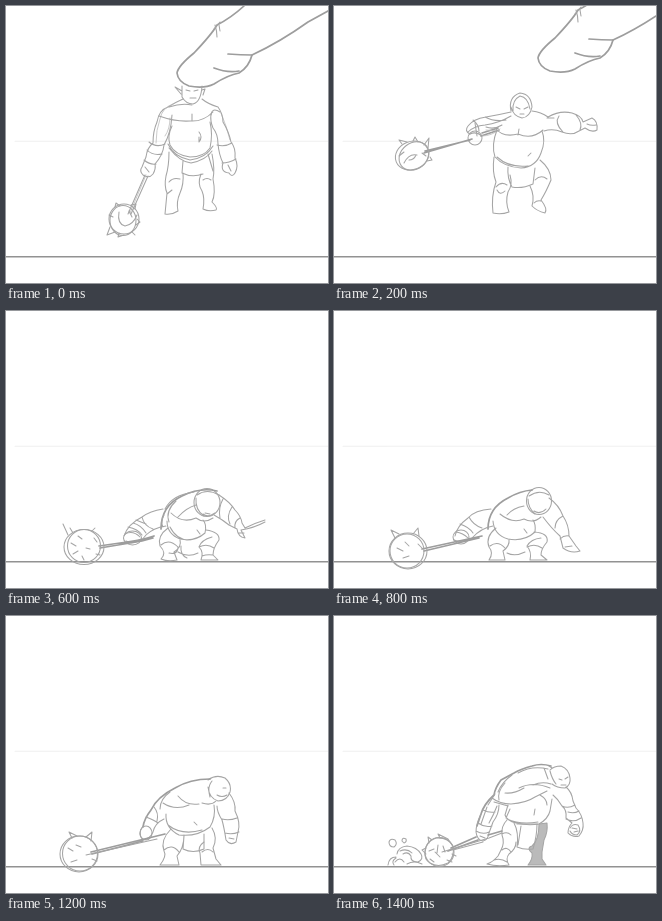
Recreate the animation shown at these times as an HTML page. Size 322 px wide and 277 px high, loop 1900 ms.

```html
<!DOCTYPE html>
<html lang="en">
<head>
<meta charset="utf-8">
<title>Giant with a mace</title>
<style>
html, body { margin: 0; width: 100%; height: 100%; overflow: hidden; background: #fff; }
svg { display: block; width: 100%; height: 100%; }
path, circle, ellipse { fill: none; stroke: #a5a5a5; stroke-width: 1.05; stroke-linecap: round; stroke-linejoin: round; }
.bold { stroke: #9d9d9d; stroke-width: 1.7; }
.thin { stroke: #bdbdbd; stroke-width: .8; }
.shade { fill: #bababa; }
.horizon { stroke: #f0f0f0; }
.ground { stroke: #929292; stroke-width: 1.6; }
.pose { visibility: hidden; animation: beat 1.9s step-end calc(var(--at) * 1s - 1.9s) infinite; }
.pose.hold { animation-name: hold; }
@keyframes beat { 0% { visibility: visible; } 10.5263%, 100% { visibility: hidden; } }
@keyframes hold { 0% { visibility: visible; } 26.3158%, 100% { visibility: hidden; } }
</style>
</head>
<body>
<svg viewBox="0 0 322 277">
<defs>
  <g id="finger">
    <path class="bold" d="M238 0Q225 12 211 19Q206 28 188 47Q172 60 171 67Q172 76 183 80Q198 83 208 78Q222 69 233 67Q243 61 246 49Q274 36 302 16L342 -6"/>
    <path class="bold" d="M208 62Q221 67 233 65M246 49Q235 49 222 48"/>
    <path d="M209 19Q211 25 211 31M214 16L208 23M213 19L214 25"/>
  </g>
</defs>

<path class="horizon" d="M9 135.3H322"/>
<path class="ground" d="M0 250.8H322"/>

<!-- pressed -->
<g class="pose" style="--at:0">
  <use href="#finger"/>
  <path d="M176 80V91Q180 98 187 98Q195 96 196 80M176 85L169 81L175 88M196 84L199 83L197 89M180 84L184 85M188 85L192 84M184 92H190"/>
  <path d="M177 93Q170 96 162 101Q153 104 151 116Q147 125 147 137Q141 142 140 151L136 161Q133 165 137 169Q143 173 147 168Q150 163 149 158Q157 149 158 139Q165 127 166 109"/>
  <path class="thin" d="M167 98Q156 102 154 113Q150 124 150 137M164 112Q164 123 159 130M215 107Q221 121 224 134"/>
  <path d="M143 136Q150 142 159 138M138 154Q144 159 150 158M141 144Q147 150 156 148M139 161L143 166"/>
  <path d="M163 101Q175 97 186 99M196 93Q202 98 212 101Q217 108 217 116Q223 126 225 136Q230 142 229 152Q233 160 229 167Q226 172 223 167Q214 166 217 157Q213 149 212 138Q212 128 207 122Q204 115 205 108"/>
  <path d="M214 106Q206 101 205 109M211 139Q219 141 226 137M216 157Q223 157 230 153M222 159L225 165"/>
  <path d="M153 110Q170 116 184 115Q197 116 207 106M186 108V115M166 120Q161 130 164 139Q169 149 184 151Q198 151 204 142Q207 128 204 116M193 126Q197 131 193 136V131"/>
  <path d="M162 138Q168 151 184 154Q200 152 207 140M163 142Q174 156 185 157Q200 154 206 145M177 155L176 167Q186 172 197 168M202 148L207 165"/>
  <path d="M163 146Q163 160 160 170Q158 180 161 187L159 208Q166 209 172 205Q170 196 174 187Q178 178 177 167M163 176Q167 171 174 173M161 188L166 184"/>
  <path d="M206 148Q209 163 207 173Q210 188 206 196Q212 202 210 204Q203 206 197 203Q199 192 196 185Q191 178 195 168M197 174Q201 171 205 174"/>
  <path d="M139 169L122 208M142 170L125 208" stroke-width="1.5"/>
  <path class="thin" d="M140 169L124 207"/>
  <circle cx="118" cy="213" r="15"/>
  <ellipse cx="117" cy="214.500" rx="13" ry="15"/>
  <path d="M113 206Q111 218 119 220Q127 219 131 209M123 205L126 211M104 221L101 229L109 226M109 201L110 197L114 200M125 199L130 198L129 203M131 213L134 216L130 219M126 226L129 229M113 227L112 231L118 229M103 209L107 211"/>
</g>

<!-- swing -->
<g class="pose" style="--at:.2">
  <use href="#finger" x="33" y="-15"/>
  <path d="M177 105Q174 91 186 87Q197 88 198 101Q196 111 188 112Q179 110 177 101M179 105Q178 94 186 90Q194 91 196 103M182 101L186 103M190 103L194 101M186 108H190"/>
  <path d="M177 106Q164 109 152 111Q139 113 134 120Q130 125 136 128M177 110Q165 117 151 119Q140 120 134 126M139 114Q145 119 145 125M151 111Q160 116 172 114"/>
  <circle cx="141" cy="132" r="7"/>
  <path d="M136 128Q142 125 148 130M141 117L143 130M152 121Q160 124 168 119"/>
  <path class="bold" d="M90 147L138 133M91 145L136 134M147 130L165 124M148 127L164 122"/>
  <path class="thin" d="M148 130Q158 130 166 123M152 124L165 125"/>
  <ellipse cx="78" cy="149.500" rx="17" ry="14" transform="rotate(-22 78 149.500)"/>
  <ellipse cx="80" cy="150" rx="16" ry="13" transform="rotate(-38 80 150)"/>
  <path d="M70 157Q75 147 83 149M75 154Q80 154 82 149M68 138L65 134L73 136M79 135L81 131L84 136M90 139L95 132L94 142M96 151L98 154L93 155M65 150L70 146M88 147L92 150"/>
  <path d="M198 105Q207 106 214 111Q226 104 238 107Q248 110 249 116L258 112Q264 115 263 124Q258 127 251 122L245 125Q238 130 228 126Q219 122 210 125M225 110Q220 117 229 126M242 109Q249 117 246 124M253 118Q257 120 262 119M213 112L220 112"/>
  <path d="M161 122Q169 132 184 128Q198 134 209 124M185 123L184 129M163 124Q157 139 161 151Q170 161 187 162Q202 161 207 147Q212 135 208 125M194 150L197 147M163 151Q175 162 194 160"/>
  <path d="M160 151Q158 166 162 176Q157 190 159 207Q167 209 175 206Q171 196 174 186Q179 179 176 169M162 181Q167 175 173 179M174 161Q173 172 178 181Q188 183 199 178L201 162M163 184Q166 190 171 185"/>
  <path d="M206 154Q217 163 217 174Q212 186 207 194Q214 203 211 207Q203 205 198 200Q201 190 196 180M201 174Q207 168 213 173M200 197Q203 194 207 195"/>
</g>

<!-- drop -->
<g class="pose" style="--at:.4">
  <path class="bold" d="M279 -1Q268 15 256 23Q249 27 250 34Q256 46 271 47Q288 45 301 33Q304 30 313 28Q320 23 325 13M287 27Q296 31 304 30M310 14L324 13"/>
  <path d="M271 0L264 9L251 27"/>
  <path d="M172 143Q169 131 179 126Q189 123 193 130Q196 138 192 145Q185 149 176 147M172 137Q174 127 183 125M183 133L186 132M189 134L192 133M186 142H190M173 138L170 148L176 147"/>
  <path d="M194 145Q200 144 204 140Q208 137 218 136Q225 137 232 140M199 158L203 154Q211 154 220 150L231 151M217 137Q213 143 218 151M228 138Q231 144 228 151M207 141L204 147"/>
  <path d="M231 144Q231 138 238 138Q245 140 244 146Q240 151 234 150Q230 148 231 144M234 142Q238 139 242 144M235 148L240 146"/>
  <path d="M172 148Q163 149 157 155Q152 162 152 166L143 169Q138 174 138 181M169 149L162 152L158 159M174 158Q169 160 165 166L157 173M143 168Q151 167 158 174Q158 181 154 186M140 174Q147 175 153 182M148 167L157 171"/>
  <path class="bold" d="M146 170Q154 169 157 176L154 185M142 176L138 182"/>
  <path d="M138 181Q128 187 127 193Q130 197 137 193Q146 188 151 185M131 190L138 185M134 194L144 180"/>
  <path class="bold" d="M153 176L101 219M154 180L102 221"/>
  <path d="M146 184L101 222"/>
  <path d="M79 221Q85 214 95 217Q105 222 104 233Q99 244 88 244Q77 242 75 232Q75 224 81 219"/>
  <circle cx="91" cy="231" r="18.200"/>
  <path d="M79 225Q83 219 90 218M79 234Q88 239 97 235M82 231L86 233M82 216L80 210L87 215M88 215L89 209L92 215M96 217L103 220L99 224M91 222L93 226M94 236L98 233"/>
  <path d="M158 160Q164 165 170 168Q179 169 184 165Q193 168 199 159M187 158L186 164M162 168Q157 181 161 191Q170 201 183 203Q197 200 202 190Q207 181 205 173L200 161M189 175Q192 179 190 183M160 187Q169 199 183 201"/>
  <path d="M161 191L165 204L172 207Q173 216 178 220L198 221L197 202M200 196L199 220M203 188L200 199M165 200Q181 209 199 199"/>
  <path d="M159 189L163 203Q157 211 161 221L160 230L162 240Q156 247 158 252Q163 256 169 252L175 240Q169 232 172 218M162 221Q166 215 171 220M162 240Q168 236 175 240M159 247Q164 249 169 244"/>
  <path d="M201 218Q207 228 203 237L204 240L222 237Q213 246 202 248Q196 247 197 239Q190 229 193 221M198 239L205 246L218 239"/>
</g>

<!-- impact -->
<g class="pose" style="--at:.6">
  <ellipse cx="201" cy="191.500" rx="13" ry="14"/>
  <path d="M191 184Q201 177 213 184M190 187Q189 199 198 205M197 203Q202 207 209 202M199 202L204 203"/>
  <path class="bold" d="M155 218Q155 195 176 185Q194 176 211 180"/>
  <path d="M159 198Q166 184 188 181M163 211Q159 200 170 190M190 194Q180 197 172 206M165 202Q176 213 190 207Q198 213 207 207"/>
  <path d="M157 198Q144 200 136 206Q122 213 118 225M160 215Q147 217 140 224L135 230M136 206Q138 215 147 218M127 212Q135 214 140 222M122 216Q132 218 136 224M158 204Q154 211 157 216M130 209L140 213"/>
  <ellipse cx="126.500" cy="227" rx="9" ry="7"/>
  <path d="M119 223Q127 219 134 226M120 230Q127 234 135 228"/>
  <path class="bold" d="M93 235L121 231Q137 229 148 225M94 237L136 230L147 227"/>
  <circle cx="78" cy="235" r="16.500"/>
  <ellipse cx="78" cy="236" rx="20" ry="17.500"/>
  <path d="M62 224L57 213M67 222L64 217M86 220L89 217M65 232L70 235M72 225L76 228M88 227L91 231M67 243L72 240M80 237L84 238M90 243L94 244M76 245L78 249"/>
  <path d="M213 184Q224 191 229 199Q235 205 236 212L239 217Q249 212 259 209M208 204Q217 209 223 214L231 218Q232 226 239 227L235 219Q248 217 259 211M226 196Q220 205 224 213M234 207Q228 210 229 217M217 188Q212 197 214 207M232 222L238 222"/>
  <path d="M161 210Q161 223 174 228Q189 231 199 222Q201 213 197 209M191 219L194 223M164 216Q171 230 185 229"/>
  <path d="M162 217Q151 225 154 235Q161 242 155 248Q162 251 171 249L168 241Q176 236 174 229M155 234Q163 227 172 236Q172 244 163 242M172 241Q182 247 192 242M175 235Q174 244 181 247"/>
  <path d="M200 219Q214 221 213 229Q207 237 207 244L212 249H195Q198 241 193 236Q195 229 206 226M193 236Q201 232 208 237M196 245Q201 243 207 244"/>
</g>

<!-- sink -->
<g class="pose" style="--at:.8">
  <ellipse cx="205" cy="190" rx="12.500" ry="13.500"/>
  <path d="M195 185Q205 178 215 184M200 200Q206 204 212 198M194 188Q194 197 201 203"/>
  <path class="bold" d="M154 218Q154 197 174 187Q186 180 198 179"/>
  <path d="M157 198Q141 199 134 207Q123 215 121 225M159 215Q147 217 138 227M135 206Q139 214 148 217M126 213Q135 216 139 222M166 203Q178 213 190 208Q199 213 207 206M190 195Q179 197 173 204"/>
  <ellipse cx="127" cy="226" rx="8" ry="7"/>
  <path d="M122 221Q129 222 134 227M120 229Q127 232 135 228"/>
  <path class="bold" d="M88 238L148 225M90 240L145 227"/>
  <circle cx="73" cy="240" r="17"/>
  <ellipse cx="74" cy="240" rx="19" ry="18"/>
  <path d="M61 227L57 219L65 223M79 223L84 217L85 225M63 237L69 240M71 231L75 235M84 233L88 237M69 247L75 245"/>
  <path d="M215 187Q225 194 229 205Q235 214 235 225L242 235L246 240Q237 243 229 237L226 225Q218 218 209 206M229 205Q221 209 221 217M235 225Q230 224 226 228M231 236L238 235"/>
  <path d="M159 210Q160 224 174 228Q190 231 201 221Q202 213 199 209M190 218L193 222M162 217Q151 226 155 236Q160 242 155 249L171 249L169 240Q176 235 175 228M156 235Q164 229 171 237M173 242Q181 246 191 241"/>
  <path d="M200 221Q215 222 213 231Q207 238 207 244L213 249H196Q198 241 193 235Q197 228 207 227M193 236Q201 232 208 237"/>
</g>

<!-- brace -->
<g class="pose" style="--at:1">
  <path d="M194 174Q201 168 213 169L217 174Q219 183 216 190Q211 195 204 193Q195 190 194 181Q195 172 206 169M196 187Q193 178 197 172M215 171L216 188L212 193M202 191Q208 195 214 190"/>
  <path class="bold" d="M195 171L182 176Q173 177 166 180Q157 185 147 185Q138 189 132 197"/>
  <path d="M192 174Q180 178 168 179M158 182L148 187L142 192M132 196Q128 203 128 208L124 215Q124 222 129 225Q135 224 137 217Q137 209 140 205Q146 201 153 202M137 190Q143 193 143 199L139 206M131 198L139 202M127 209Q133 205 139 209M148 187Q151 193 157 196"/>
  <path d="M165 186L172 190M157 196Q163 205 174 207M183 180Q188 188 183 193M171 201Q182 207 193 197M191 190L187 194M176 214L182 211M182 217L185 214L186 218"/>
  <path d="M125 217Q124 208 129 205Q135 206 135 213Q132 222 128 222"/>
  <path class="bold" d="M80 235L125 222M82 232L122 221M135 221L155 219"/>
  <path d="M73 238L151 221M79 237L139 222M78 233L130 220"/>
  <path d="M56 232Q57 222 66 218Q76 214 85 220Q92 226 91 235Q90 246 80 250Q69 252 61 246Q55 240 56 232"/>
  <circle cx="73.500" cy="233.500" r="17.500"/>
  <path d="M67 217L64 212L71 215M79 217L85 211L84 220M64 225L69 229M71 225L75 230M60 235L66 235M66 243L71 239M74 239L79 243M87 239L92 242M77 246L80 249"/>
  <path class="bold" d="M153 201Q154 209 159 213Q169 221 180 223"/>
  <path d="M155 205L159 213Q169 223 185 226Q195 224 200 217Q202 209 200 201L203 195M157 209Q166 218 178 220"/>
  <path d="M215 190Q219 197 215 204L214 209Q217 216 215 223L213 233L216 241Q224 244 229 250M204 195Q206 202 205 208Q202 215 204 221Q207 231 205 238L208 247M204 208Q209 211 214 207M204 221Q210 223 216 220M206 239Q211 242 216 240M211 243L222 250M207 247L217 249"/>
  <path d="M157 212L158 221Q162 227 157 232Q156 238 158 241L153 248L170 249Q165 242 168 235L173 231Q174 226 172 221M157 229Q165 227 168 235M171 240Q180 241 189 238M157 241Q163 238 167 242"/>
  <path d="M195 223Q188 227 188 234Q191 240 188 249H208M200 220Q204 226 202 234L205 243M189 238Q195 233 201 237M190 230L195 234"/>
</g>

<!-- push up -->
<g class="pose" style="--at:1.2">
  <path d="M202 164Q210 158 219 162Q226 168 224 176Q221 185 212 185Q203 182 202 171M204 181Q201 171 206 165M211 179Q216 182 221 179M217 172H220"/>
  <path class="bold" d="M204 163Q184 163 169 172Q151 181 145 194Q138 203 137 211"/>
  <path d="M164 176Q154 183 154 193M137 210Q131 218 137 224Q144 223 147 216Q149 207 158 203M148 191Q153 197 151 205M140 201Q148 204 152 207M157 187Q169 195 183 189M172 180Q180 190 193 188M196 187Q205 190 210 185"/>
  <ellipse cx="140" cy="217" rx="6" ry="7"/>
  <path class="bold" d="M85 236L159 218M86 238L137 225"/>
  <path d="M80 239L151 223"/>
  <circle cx="74" cy="237.500" r="17.500"/>
  <ellipse cx="73" cy="238" rx="19" ry="18"/>
  <path d="M66 222L63 216L71 220M80 221L86 216L85 225M62 232L67 235M70 229L75 231M65 246L71 244M86 243L91 245"/>
  <path d="M160 198Q159 212 173 219Q191 221 204 211Q210 201 208 189M188 206L191 209M162 209Q176 220 196 214"/>
  <path d="M223 177Q230 186 229 195Q235 207 232 216L230 226Q224 230 220 224Q218 211 216 204Q211 196 211 190M216 203Q223 205 231 202M219 217Q226 219 233 216M223 222L228 223"/>
  <path d="M165 213Q154 224 158 235Q161 240 154 249H173L171 240Q178 232 178 219M158 234Q166 227 173 236M178 220L177 233Q187 238 198 233V218"/>
  <path d="M206 212Q212 222 207 232L210 243L215 249H195L194 237Q191 231 198 226M196 236Q202 231 207 236"/>
</g>

<!-- stand and drag -->
<g class="pose hold" style="--at:1.4">
  <path d="M216 154Q220 150 227 150Q235 153 236 162Q237 169 231 172Q223 172 218 168M216 155Q218 163 222 168M225 163L228 164M231 163L234 161M227 169H232M218 152L215 150"/>
  <path class="bold" d="M217 150Q207 147 198 150Q187 153 180 157L167 164Q161 172 160 179Q150 188 147 198L143 210"/>
  <path d="M214 153Q198 149 184 157M178 159Q168 166 164 176M161 178L154 189M171 167Q163 176 165 184M158 182Q166 188 177 188Q192 187 201 181L213 175M160 186L174 190M171 177Q180 178 190 172M185 172Q199 165 216 172M199 169Q208 165 217 168M210 152L214 163"/>
  <path d="M147 198Q142 208 142 216Q143 224 149 225Q154 224 155 217L159 206Q165 198 165 189M149 194Q155 197 161 196M144 207Q151 212 158 210M142 215Q149 219 155 216M153 191L147 208M163 190Q160 198 155 207M146 220L151 222"/>
  <path d="M174 189L171 199Q173 205 182 207Q194 210 205 208Q214 203 216 195L218 183M201 193L200 199M173 203Q186 209 204 206M206 179Q213 183 213 189M176 193L172 202"/>
  <path d="M232 171Q238 176 239 185L242 192Q248 198 249 207Q250 214 245 220Q239 222 234 217Q234 211 238 207L232 202Q233 194 228 190Q224 183 219 179M228 190Q234 193 241 189M232 203Q240 207 247 202M234 196Q240 198 245 195"/>
  <path d="M236 212Q239 207 244 209Q248 215 243 219Q238 219 236 215M238 212L243 213M240 216L244 215"/>
  <path class="shade" d="M205 208L213 207Q214 216 210 224L208 236L208 243L212 249H194Q199 243 198 237Q192 232 198 230Q205 224 205 208Z"/>
  <path d="M180 207Q185 216 183 231Q190 234 199 233Q203 220 203 208M183 208L204 208M187 210L184 229"/>
  <path d="M173 204Q167 210 168 219Q171 227 167 234L164 240Q159 246 153 248Q163 251 175 249Q171 243 175 238Q182 233 182 226M168 234Q173 230 177 236M160 244Q167 242 173 246M168 218Q173 215 177 219"/>
  <path class="bold" d="M114 235L144 224M117 232L142 221M154 219L168 215"/>
  <path d="M108 236L155 222L168 217M119 234L149 226"/>
  <path d="M91 236Q92 225 102 222Q114 221 119 230Q121 241 114 247Q104 252 96 247Q90 243 91 236"/>
  <circle cx="105.500" cy="236" r="14.500"/>
  <path d="M106 222L104 218L114 223L118 229M98 224L94 221L95 227M92 232L88 234L92 238M95 235L100 233M101 236L106 241M104 229L103 237M113 244L118 246M96 243L100 246M118 238L122 240M109 230L111 236"/>
  <path d="M54 249Q55 241 62 241M63 238Q64 231 73 230Q83 231 87 238Q90 243 84 246Q76 246 77 240Q74 235 69 238M62 242Q57 245 60 249M61 246Q66 240 70 246M73 248Q80 244 88 248M66 235Q73 232 78 237"/>
  <path d="M55 226Q56 222 61 224Q64 228 60 231Q55 231 55 226M68 225Q68 221 72 223Q73 226 70 227Z"/>
</g>
</svg>
</body>
</html>
```
